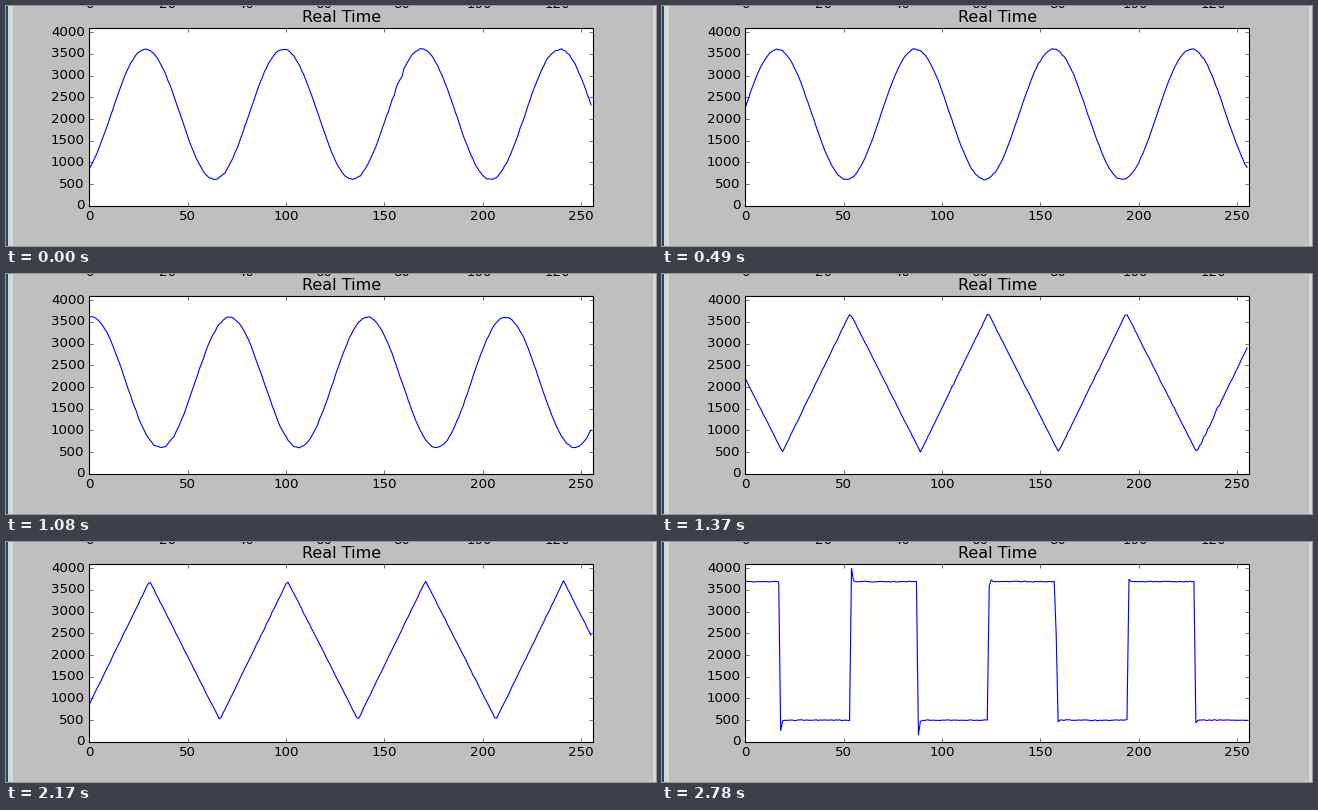
A matplotlib script that plays this animation: 650 px wide and 240 px high, repeating every 2880 ms.

```python
import numpy as np
import matplotlib.pyplot as plt
from matplotlib.animation import FuncAnimation
from matplotlib.patches import Rectangle

W, H, DPI = 650, 240, 80
TICK, LOOP = 10, 2880          # ms

plt.style.use("classic")
plt.rcParams.update({
    "font.family": "DejaVu Sans",
    "figure.facecolor": "0.75",
    "savefig.facecolor": "0.75",
    "savefig.dpi": DPI,
})

# Sweep number against time; even spacing between the key points
COUNT, TRIANGLE, SQUARE = 47, 21, 36
KEY_STEPS = [0, 12, 17, TRIANGLE, 28, 35, SQUARE, 46]
KEY_TIMES = [0, 590, 860, 1140, 1670, 2170, 2220, 2780]
STARTS = TICK * np.round(
    np.interp(range(COUNT), KEY_STEPS, KEY_TIMES) / TICK)

X = np.arange(256)
PERIOD, RISE, HIGH = 70.15, 34.4, 34.05
DRIFT = -8.44                  # samples per sweep


def sine(step):
    peak = 28.6 - 22.12 * step - 0.0149 * step ** 2
    return 2110 + 1500 * np.cos(2 * np.pi * (X - peak) / PERIOD)


def triangle(step):
    peak = 53.3 + DRIFT * (step - 24)
    u = (X - peak) % PERIOD
    return np.interp(u, [0, PERIOD - RISE, PERIOD], [3705, 505, 3705])


def edge(t):
    """Step response: a steep rise with a decaying overshoot."""
    t = np.clip(t, -1, 10)
    rise = 1 / (1 + np.exp(-(t - 0.215) / 0.02))
    return rise * (1 + 0.14 * np.exp(-2.5 * (t - 0.25)))


def square(step):
    start = 53.6 + DRIFT * (step - 46)
    u = (X - start) % PERIOD
    level = np.where(u < HIGH, edge(u), 1 - edge(u - HIGH))
    return 500 + 3190 * level


def sweep(step):
    rng = np.random.default_rng(step)
    if step < TRIANGLE:
        y, sigma = sine(step), 8
    elif step < SQUARE:
        y, sigma = triangle(step), 6
    else:
        y, sigma = square(step), 5
    noise = rng.normal(0, sigma, X.size)
    # Some sweeps pick up a short stretch of interference
    if step < SQUARE and rng.random() < 0.4:
        noise[np.abs(X - rng.integers(X.size)) < 6] *= 4
    return y + noise


def add_axes(left, top, right, bottom):
    return fig.add_axes([left / W, 1 - bottom / H,
                         (right - left) / W, (bottom - top) / H])


def strip(x0, x1, color):
    fig.add_artist(Rectangle((x0 / W, 0), (x1 - x0) / W, 1, color=color,
                             linewidth=0, antialiased=False, zorder=-1))


fig = plt.figure(figsize=(W / DPI, H / DPI), dpi=DPI)
strip(0, 2, "#1f4e63")
strip(2, 7, "#d6d6d6")
strip(647, 650, "#d6d6d6")

# Plot above: only the feet of its tick labels reach the stage
upper = add_axes(83.25, -190.8, 587, -12.9)
upper.set_xlim(0, 129)
upper.set_xticks(range(0, 121, 20))
upper.set_yticks([])

ax = add_axes(83.25, 22, 587, 199.9)
ax.set_title("Real Time")
ax.set_xlim(0, 256)
ax.set_ylim(0, 4096)
ax.set_xticks(range(0, 251, 50))
ax.set_yticks(range(0, 4001, 500))

SWEEPS = [sweep(k) for k in range(COUNT)]
line, = ax.plot(X, SWEEPS[0], color="b", linewidth=1)


def update(frame):
    step = np.searchsorted(STARTS, frame * TICK, side="right") - 1
    line.set_ydata(SWEEPS[step])
    return line,


anim = FuncAnimation(fig, update, frames=LOOP // TICK, interval=TICK,
                     repeat=True, repeat_delay=0)
plt.show()
```
